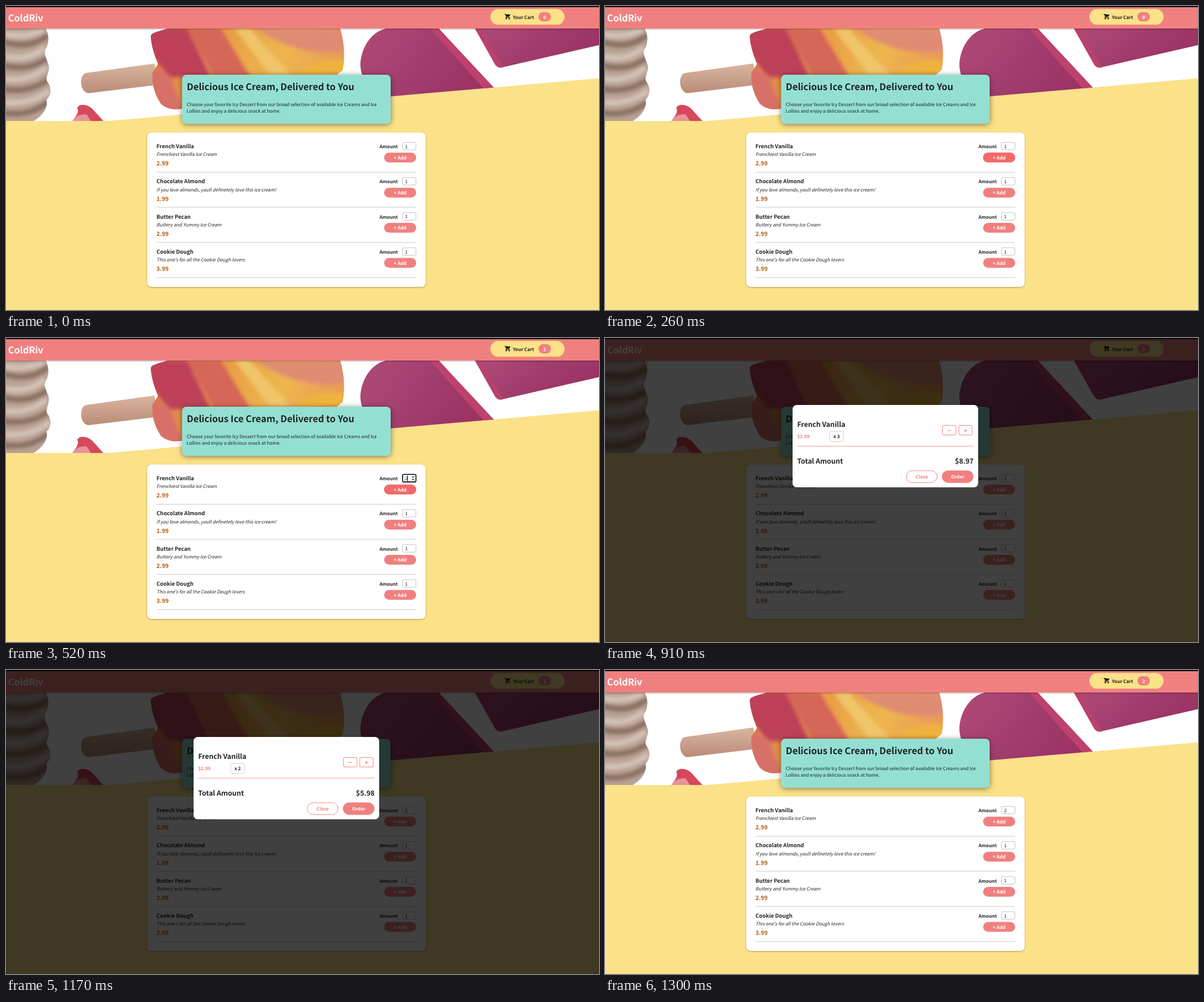
An HTML page that plays this animation: 999x513 px, repeating every 1690 ms.

```html
<!DOCTYPE html>
<html lang="en">
<head>
<meta charset="utf-8">
<title>Ice cream shop</title>
<style>
html, body { margin: 0; width: 100%; height: 100%; overflow: hidden; background: #fbe188; }
svg { display: block; width: 999px; height: 513px; }
text {
  font: 7.8px "Noto Sans CJK JP", "Noto Sans CJK SC", "Noto Sans CJK", sans-serif;
  fill: #222; text-rendering: geometricPrecision; white-space: pre;
}
.b { font-weight: 700; }
.i { font-style: italic; }
.h1 { font-size: 15.6px; font-weight: 700; }
.h2 { font-size: 11.7px; font-weight: 700; }
.h3 { font-size: 9.1px; font-weight: 700; }
.price { font-size: 9.76px; font-weight: 700; fill: #b65a08; }
.mid { text-anchor: middle; }
.end { text-anchor: end; }
.white { fill: #fff; }
.coral { fill: #f08080; }
.line { fill: none; stroke: #ee8a8a; }
.box { fill: #fff; stroke: #c4c4c4; }

/* state windows over one 1690 ms loop */
.t { animation: 1690ms step-end infinite; visibility: hidden; }
.none { animation-name: none-in; }
.one { animation-name: one-in; }
.three { animation-name: three-in; }
.two { animation-name: two-in; }
.first { animation-name: first-in; }
.later { animation-name: later-in; }
.hover { animation-name: hover-in; }
@keyframes none-in { 0% { visibility: visible } 30.76%, 100% { visibility: hidden } }
@keyframes one-in { 0% { visibility: hidden } 30.76% { visibility: visible } 46.15%, 100% { visibility: hidden } }
@keyframes three-in { 0% { visibility: hidden } 46.15% { visibility: visible } 69.23%, 100% { visibility: hidden } }
@keyframes two-in { 0% { visibility: hidden } 69.23%, 100% { visibility: visible } }
@keyframes first-in { 0% { visibility: visible } 30.76%, 100% { visibility: hidden } }
@keyframes later-in { 0% { visibility: hidden } 30.76%, 100% { visibility: visible } }
@keyframes hover-in { 0% { visibility: hidden } 15.38% { visibility: visible } 46.15%, 100% { visibility: hidden } }

.dim { opacity: 0; animation: dim 1690ms step-end infinite; }
@keyframes dim { 0% { opacity: 0 } 46.15% { opacity: .75 } 76.92%, 100% { opacity: 0 } }
.modal { opacity: 0; animation: drop 1690ms step-end infinite; }
@keyframes drop {
  0% { opacity: 0; transform: translateY(-21.5px) }
  46.15% { opacity: .08; transform: translateY(-21.5px) }
  53.84% { opacity: 1; transform: none }
  76.92%, 100% { opacity: 0; transform: none }
}
</style>
</head>
<body>
<svg viewBox="0 0 999 513">
  <defs>
    <clipPath id="slant"><path d="M0 38H999V122L172 194H0Z"/></clipPath>
    <clipPath id="pop"><path d="M244 52C243 45 258 43 272 38H563C569 58 572 85 567 108L540 130H298V173C284 176 271 174 261 165C250 148 245 130 247 112L256 98C250 82 245 68 244 52Z"/></clipPath>
    <clipPath id="whip"><path d="M0 38H67C73 50 73 64 66 74C63 82 69 90 72 100C74 112 66 119 69 127C77 136 77 150 68 158C72 172 60 186 47 194H0Z"/></clipPath>
    <linearGradient id="gold" x2="1" y2=".2">
      <stop offset="0" stop-color="#d86a4d"/><stop offset=".35" stop-color="#e89a45"/>
      <stop offset=".7" stop-color="#eeb64e"/><stop offset="1" stop-color="#e89a58"/>
    </linearGradient>
    <linearGradient id="plum" x2="1" y2=".4">
      <stop offset="0" stop-color="#b04a78"/><stop offset=".6" stop-color="#a03c6c"/><stop offset="1" stop-color="#9b3363"/>
    </linearGradient>
    <linearGradient id="wood" x2="0" y2="1">
      <stop offset="0" stop-color="#d9b5a0"/><stop offset="1" stop-color="#b98d78"/>
    </linearGradient>
    <filter id="soft" x="-20%" y="-20%" width="140%" height="140%"><feGaussianBlur stdDeviation="3"/></filter>
    <filter id="glow" x="-20%" y="-40%" width="140%" height="180%"><feDropShadow dx="0" dy="1.5" stdDeviation="5" flood-opacity=".5"/></filter>
    <filter id="edge" x="-5%" y="-5%" width="110%" height="115%"><feDropShadow dx="0" dy="1" stdDeviation="1.8" flood-opacity=".3"/></filter>
  </defs>

  <rect width="999" height="513" fill="#fbe188"/>

  <g clip-path="url(#slant)">
    <rect y="38" width="999" height="156" fill="#fff"/>
    <g clip-path="url(#whip)">
      <rect y="38" width="80" height="156" fill="#b9a294"/>
      <g filter="url(#soft)" fill="none" stroke-width="9">
        <path d="M-5 60Q40 75 72 48M-5 100Q40 112 72 86M-5 140Q40 148 75 122M-5 180Q40 188 74 160" stroke="#876d60"/>
        <path d="M-5 47Q30 55 64 40M-5 84Q35 95 66 70M-5 122Q35 130 68 104M-5 162Q40 168 74 142" stroke="#d6c5b9"/>
      </g>
    </g>
    <path d="M135 113L250 97L257 133L140 147C124 147 122 116 135 113Z" fill="url(#wood)"/>
    <g clip-path="url(#pop)">
      <rect x="240" y="38" width="340" height="140" fill="url(#gold)"/>
      <g filter="url(#soft)">
        <path d="M240 38H305L345 120H275L240 75Z" fill="#bd3f58"/>
        <path d="M305 38H362L412 120H350Z" fill="#d66659"/>
        <path d="M244 105L275 116L300 180H245Z" fill="#d77168"/>
        <path d="M420 38H575V75C520 86 470 70 420 38Z" fill="#e08c73"/>
        <path d="M385 38H410L480 116H445Z" fill="#f0c56b"/>
        <path d="M505 100Q545 88 572 92V116H490Z" fill="#efb33d"/>
      </g>
    </g>
    <path d="M640 38H729L822 138V170H640C616 148 597 125 597 98C598 72 614 44 640 38Z" fill="url(#plum)"/>
    <path d="M714 38H729L822 138L806 141Z" fill="#bd426d"/>
    <path d="M790 38H999V66L834 104C828 104 825 101 822 95Z" fill="url(#plum)"/>
    <path d="M790 38H799L838 103L834 104C828 104 825 101 822 95Z" fill="#b9416f"/>
    <path d="M112 194C118 185 124 179 120 172C123 165 136 165 145 173L164 194Z" fill="#d6485b"/>
    <path d="M112 194C118 185 125 182 136 183L143 194Z" fill="#e8929a"/>
  </g>

  <rect y="2" width="999" height="36" fill="#f08080" filter="url(#edge)"/>
  <rect width="999" height="2"/>
  <text class="h1 white" x="3.5" y="25.6">ColdRiv</text>
  <rect x="816" y="5" width="125" height="26.6" rx="13.3" fill="#fbe188"/>
  <path d="M840 13.2h1.9l.5 1.1h7.3l-2 3.9h-4l-.5 1h6v1h-7.3l-.3-.8 1-1.7-1.7-3.5h-.9z" fill="#111"/>
  <circle cx="842.7" cy="21.5" r="1.1"/><circle cx="847.7" cy="21.5" r="1.1"/>
  <text class="b" x="854" y="21.6">Your Cart</text>
  <rect x="897" y="10.3" width="21" height="15.8" rx="7.9" fill="#f08080"/>
  <g class="mid">
    <text class="b white t none" x="907.5" y="21.6">0</text>
    <text class="b white t one" x="907.5" y="21.6">1</text>
    <text class="b white t three" x="907.5" y="21.6">3</text>
    <text class="b white t two" x="907.5" y="21.6">2</text>
  </g>

  <rect x="296.8" y="116" width="351.2" height="82.4" rx="7" fill="#93e0d3" filter="url(#glow)"/>
  <text class="h1" x="304.5" y="142.2">Delicious Ice Cream, Delivered to You</text>
  <text x="304.5" y="168.6">Choose your favorite Icy Dessert from our broad selection of available Ice Creams and Ice</text>
  <text x="304.5" y="180.2">Lollies and enjoy a delicious snack at home.</text>

  <rect x="238" y="213.5" width="469" height="260.5" rx="7.5" fill="#fff" filter="url(#edge)"/>
  <g id="list"></g>
  <g class="t hover">
    <rect x="637" y="247.6" width="54" height="16.4" rx="8.2" fill="#f06a6a"/>
    <text class="b white mid" x="664" y="258.8">+ Add</text>
  </g>
  <text class="t first" x="672.2" y="239.9">1</text>
  <text class="t later" x="672.2" y="239.9">2</text>
  <g class="t one">
    <rect x="668.2" y="230.3" width="22.4" height="12.6" rx="2" fill="none" stroke="#111" stroke-width="1.6"/>
    <path d="M676.5 232v9.5" stroke="#111"/>
    <path d="M683.6 235.4l2.2-2.4 2.2 2.4zM683.6 238l2.2 2.4 2.2-2.4z" fill="#333"/>
  </g>

  <rect class="dim" width="999" height="513"/>

  <g class="modal">
    <rect x="316" y="113" width="312.6" height="139" rx="6.8" fill="#fff"/>
    <text class="h2" x="323.7" y="150">French Vanilla</text>
    <text class="b coral" x="323.7" y="169">$2.99</text>
    <rect x="378.5" y="157.5" width="23.5" height="17" rx="2.8" fill="#fff" stroke="#e3c9c9"/>
    <rect class="line" x="568.5" y="147.5" width="22.6" height="16.2" rx="2.5"/>
    <rect class="line" x="596" y="147.5" width="22.6" height="16.2" rx="2.5"/>
    <path class="line" d="M577 156.2h5.4M604.6 156.2h5.4M607.3 153.5v5.4" stroke-width="1.2"/>
    <path class="line" d="M324 182.5H621" stroke-opacity=".8"/>
    <text class="h2" x="323.7" y="212.1">Total Amount</text>
    <rect class="line" x="507.5" y="223.9" width="52" height="20" rx="10"/>
    <rect class="coral" x="567.5" y="223.4" width="53.3" height="21" rx="10.5"/>
    <text class="b coral mid" x="533.5" y="237">Close</text>
    <text class="b white mid" x="594.2" y="237">Order</text>
    <g class="t three">
      <text class="b mid" x="390.2" y="169">x 3</text>
      <text class="h2 end" x="621" y="212.1">$8.97</text>
    </g>
    <g class="t two">
      <text class="b mid" x="390.2" y="169">x 2</text>
      <text class="h2 end" x="621" y="212.1">$5.98</text>
    </g>
  </g>
</svg>
<script>
const meals = [
  ["French Vanilla", "Frenchiest Vanilla Ice Cream", "2.99"],
  ["Chocolate Almond", "If you love almonds, youll definetely love this ice cream!", "1.99"],
  ["Butter Pecan", "Buttery and Yummy Ice Cream", "2.99"],
  ["Cookie Dough", "This one's for all the Cookie Dough lovers", "3.99"]
];

// the first row's amount changes, so it is drawn separately
document.getElementById("list").innerHTML = meals.map(([name, note, price], i) => `
  <g transform="translate(0 ${(i * 59.25).toFixed(2)})">
    <text class="h3" x="253.6" y="240">${name}</text>
    <text class="i" x="253.6" y="253.4">${note}</text>
    <text class="price" x="253.6" y="269.4">${price}</text>
    <text class="b end" x="660" y="240">Amount</text>
    <rect class="box" x="668" y="230.2" width="22.6" height="12.6" rx="2"/>
    ${i ? '<text x="672.2" y="239.9">1</text>' : ""}
    <rect class="coral" x="637" y="247.6" width="54" height="16.4" rx="8.2"/>
    <text class="b white mid" x="664" y="258.8">+ Add</text>
    <path d="M253.6 280.5H691" stroke="#ccc"/>
  </g>`).join("");
</script>
</body>
</html>
```
